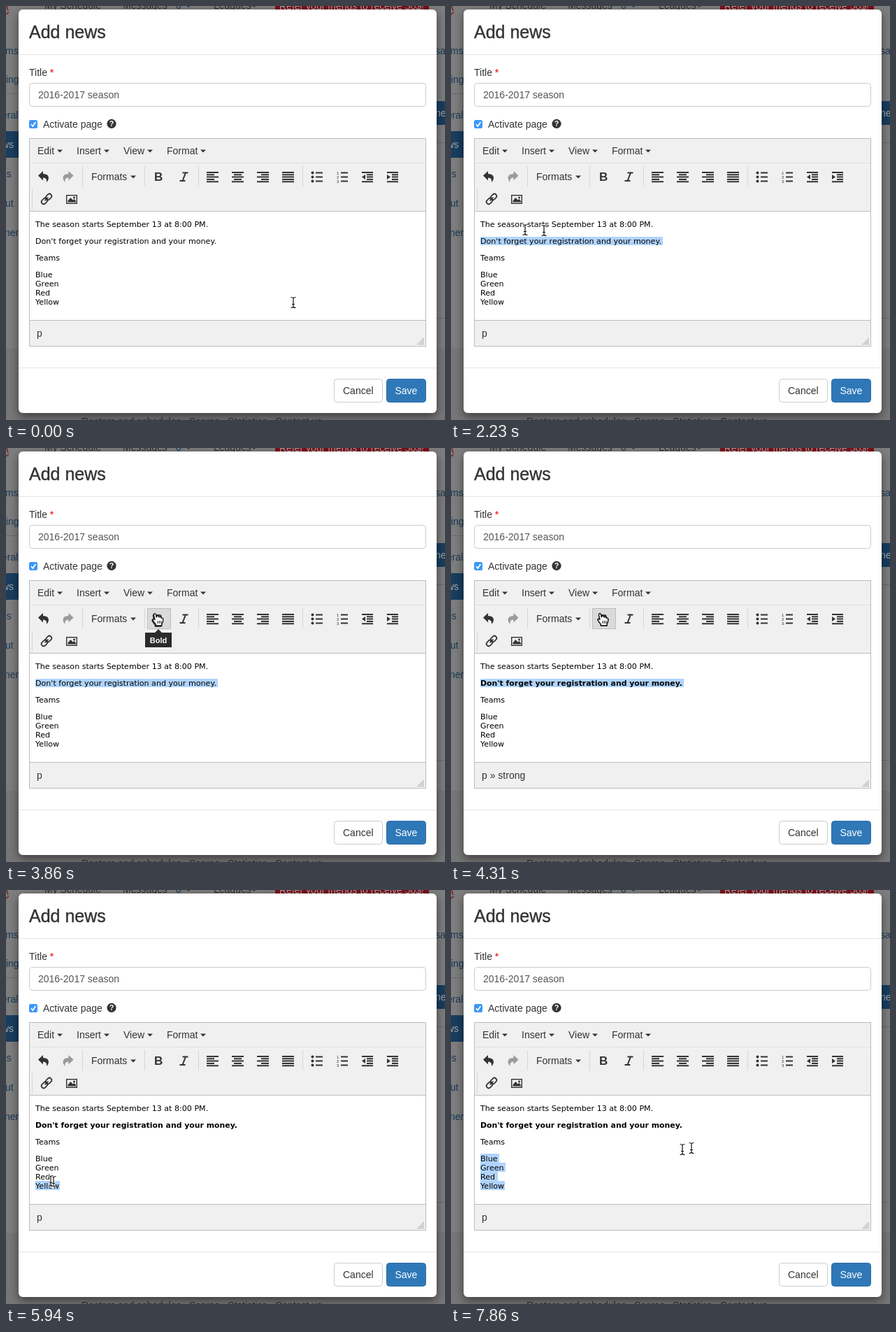
An HTML page that plays this animation: 628x592 px, repeating every 8 s.

```html
<!DOCTYPE html>
<html lang="en">
<head>
<meta charset="utf-8">
<title>Add news</title>
<style>
html, body { margin: 0; width: 100%; height: 100%; overflow: hidden; background: #7e7e7e; }
svg { display: block; width: 628px; height: 592px; }
text { font: 14px "Liberation Sans", sans-serif; fill: #333; white-space: pre; }
.page text { fill: #2c2c2c; }
.page .link { fill: #17395a; }
.page .light { fill: #a6a6a6; }
.modal { filter: drop-shadow(0 5px 7px rgba(0, 0, 0, .5)); }
.icon { fill: none; stroke: #333; stroke-width: 2; }
.solid { fill: #333; }
.content text { font: 11.1px "DejaVu Sans", sans-serif; fill: #000; }
.content .strong { font-weight: bold; font-size: 10.9px; }
.selection rect { fill: #b0d4fd; }
</style>
</head>
<body>
<svg viewBox="0 0 628 592">
  <defs>
    <path id="drop" class="solid" d="M0 0h8l-4 4z"/>
    <g id="ibeam" fill="none">
      <path id="beam" d="M-3.5 -7.5q3 0 3.5 1.5q.5 -1.5 3.5 -1.5M0 -6.5V6.5M-3.5 7.5q3 0 3.5 -1.5q.5 1.5 3.5 1.5M-2 2.5h4" stroke="#fff" stroke-width="2.6"/>
      <use href="#beam"/>
      <path d="M-3.5 -7.5q3 0 3.5 1.5q.5 -1.5 3.5 -1.5M0 -6.5V6.5M-3.5 7.5q3 0 3.5 -1.5q.5 1.5 3.5 1.5M-2 2.5h4" stroke="#111" stroke-width="1.2"/>
    </g>
    <path id="arrow" d="M0 0v14l3.3 -3 2.2 5 2.2 -1 -2.2 -4.8h4.5z" fill="#000" stroke="#fff"/>
    <g id="hand" stroke="#111" stroke-linejoin="round">
      <path d="M-2.5 9L-3 6.5Q-7 2 -7 .5Q-6.5 -1.5 -4 .5L-5.5 -6Q-5.5 -8.5 -3.8 -8.3Q-2.5 -8 -1.8 -3Q-1.6 -5 .2 -4.8Q1.8 -4.5 2 -3Q3 -4.5 4.5 -3.3L5 -1.8Q7.5 -2.5 7.8 0Q8 4 6 6.5V9z" fill="#fff" stroke-width="1.3"/>
      <path d="M0 2v4M2.4 2v4M4.8 2v4" fill="none"/>
    </g>
  </defs>

  <g class="page">
    <rect width="628" height="592" fill="#7e7e7e"/>
    <rect y="490" width="628" height="102" fill="#777"/>
    <path d="M0 125.5h18M616 195.5h12M616 446.5h12" stroke="#696969"/>
    <path d="M0 12l4 -3M1 0l2 7" stroke="#851820" stroke-width="1.5"/>
    <text x="55" y="4">My Schedule</text>
    <text x="167" y="4">Messages</text>
    <text x="243" y="4" class="link" font-weight="bold">0</text>
    <use href="#drop" x="257" y="-2"/>
    <text x="297" y="4">Leagues</text>
    <use href="#drop" x="351" y="-2"/>
    <rect x="385" width="220" height="8" fill="#7d0f19"/>
    <text x="391" y="5" class="light">Refer your friends to receive 50$!</text>
    <text x="-1" y="69" class="link">ms</text>
    <text x="-4" y="110" class="link">ting</text>
    <text x="-6" y="161" class="link">eral</text>
    <rect y="179" width="18" height="38" fill="#193e5f"/>
    <text x="-6" y="203" class="light">ws</text>
    <text x="-7" y="245" class="link">es</text>
    <text x="-1" y="287" class="link">ut</text>
    <text x="-2" y="329" class="link">ner</text>
    <text x="614" y="69" class="link">sage</text>
    <rect x="612" y="136" width="16" height="34" fill="#193e5f"/>
    <text x="614" y="158" class="light">ne</text>
    <text x="108" y="599" font-weight="bold">Rosters and schedules   Scores   Statistics   Contact us</text>
  </g>

  <rect class="modal" x="18" y="5" width="598" height="577" rx="6" fill="#fff"/>
  <path d="M18 69.5h598M18 517.5h598" stroke="#e5e5e5"/>
  <text x="33" y="46" style="font-size:25px" stroke="#333" stroke-width=".4">Add news</text>
  <text x="33" y="100" font-weight="bold">Title <tspan fill="#e00">*</tspan></text>
  <rect x="33.5" y="110.5" width="567" height="33" rx="4" fill="#fff" stroke="#ccc"/>
  <text x="46" y="132" style="fill:#555">2016-2017 season</text>
  <rect x="33" y="163" width="12" height="12" rx="2.5" fill="#3c97f7"/>
  <path d="M36 169.3l2.3 2.7 4 -6" fill="none" stroke="#fff" stroke-width="1.7"/>
  <text x="53" y="174">Activate page</text>
  <circle cx="151" cy="168.3" r="6.6" fill="#333"/>
  <text x="151" y="172.3" text-anchor="middle" style="font-size:11px;font-weight:bold;fill:#fff">?</text>

  <rect x="33.5" y="189.5" width="567" height="297" fill="#f0f0f0" stroke="#bcbcbc"/>
  <rect x="33.5" y="293.5" width="567" height="156" fill="#fff" stroke="#bcbcbc"/>
  <path d="M34 224.5h566" stroke="#e0e0e0"/>
  <path d="M109.5 229v29M198.5 229v29M275.5 229v29M424.5 229v29M37.5 262v29" stroke="#d6d6d6"/>
  <text x="45" y="212">Edit</text><use href="#drop" x="73" y="205.5"/>
  <text x="101" y="212">Insert</text><use href="#drop" x="140" y="205.5"/>
  <text x="168" y="212">View</text><use href="#drop" x="202" y="205.5"/>
  <text x="230" y="212">Format</text><use href="#drop" x="278" y="205.5"/>
  <text x="122" y="249">Formats</text><use href="#drop" x="178" y="242.5"/>

  <rect id="boldButton" x="202.5" y="229.5" width="33" height="29" fill="#dadada" stroke="#bdbdbd"/>
  <path id="undo" class="solid" d="M46 242.5l7 -6.5v4q8 0 8 6q0 3 -3 6q1 -6.500 -5 -6.500v4z"/>
  <use href="#undo" transform="matrix(-1 0 0 1 142.500 0)" opacity=".45"/>
  <text x="212" y="250" style="font-size:17px;font-weight:bold">B</text>
  <path class="icon" d="M252.500 238.500h8M248.500 250h8M257 238.500l-4.500 11.500" stroke-width="1.8"/>
  <path class="icon" d="M287 238h17M287 241.300h11M287 244.600h17M287 247.900h11M287 251.200h17
    M323 238h17M326 241.300h11M323 244.600h17M326 247.900h11M323 251.200h17
    M359 238h17M365 241.300h11M359 244.600h17M365 247.900h11M359 251.200h17
    M395 238h17M395 241.300h17M395 244.600h17M395 247.900h17M395 251.200h17"/>
  <path class="icon" d="M443 238.500h10M443 244.500h10M443 250.500h10M479 238.500h10M479 244.500h10M479 250.500h10
    M509 238h16M516 241.300h9M516 244.600h9M516 247.900h9M509 251.200h16
    M545 238h16M552 241.300h9M552 244.600h9M552 247.900h9M545 251.200h16"/>
  <path class="solid" d="M514 241v7l-5 -3.500zM545 241v7l5 -3.500z"/>
  <g class="solid"><circle cx="438.500" cy="238.500" r="2"/><circle cx="438.500" cy="244.500" r="2"/><circle cx="438.500" cy="250.500" r="2"/></g>
  <g style="font-size:6px">
    <text x="473" y="240.500" style="font-size:6px">1</text>
    <text x="473" y="246.500" style="font-size:6px">2</text>
    <text x="473" y="252.500" style="font-size:6px">3</text>
  </g>
  <g class="icon" transform="rotate(-45 58 276)" style="stroke-width:1.7">
    <rect x="49" y="272.800" width="9.500" height="6.400" rx="3.200"/>
    <rect x="57.500" y="272.800" width="9.500" height="6.400" rx="3.200"/>
    <path d="M54.500 276h7"/>
  </g>
  <rect class="icon" x="86.700" y="270.700" width="14.600" height="11.600" style="stroke-width:1.400"/>
  <path class="solid" d="M88.500 280.500v-2l4 -4.500 3 3.500 2 -1.500 2.500 3v1.500z"/>
  <circle class="solid" cx="97.500" cy="274" r="1.500"/>

  <g class="content">
    <g class="selection">
      <rect data-from="14" data-to="15" x="214" y="330" width="89" height="12"/>
      <rect data-from="15" data-to="28" x="42" y="330" width="261" height="12"/>
      <rect data-from="28" data-to="38" x="42" y="330" width="291" height="12"/>
      <rect data-from="45" x="42" y="377" width="27" height="13"/>
      <rect data-from="42" x="42" y="390" width="36" height="13"/>
      <rect data-from="41" x="42" y="403" width="25" height="13"/>
      <rect data-from="40" x="42" y="416" width="35" height="13"/>
    </g>
    <text x="42" y="316">The season starts September 13 at 8:00 PM.</text>
    <text x="42" y="340" data-to="28">Don't forget your registration and your money.</text>
    <text x="42" y="340" data-from="28" class="strong">Don't forget your registration and your money.</text>
    <text x="42" y="364">Teams</text>
    <text x="42" y="388">Blue</text>
    <text x="42" y="401">Green</text>
    <text x="42" y="414">Red</text>
    <text x="42" y="427">Yellow</text>
    <rect data-from="1" data-to="5" x="77" y="416" width="1" height="13"/>
  </g>

  <text x="44" y="473">p<tspan data-from="28" data-to="38"> » strong</tspan></text>
  <path d="M597 475v9M595 477v7M593 479v5M591 481v3M589 483v1" stroke="#777" stroke-dasharray="1 1"/>

  <rect x="469.500" y="533.500" width="69" height="33" rx="4" fill="#fff" stroke="#ccc"/>
  <text x="482" y="555">Cancel</text>
  <rect x="544.500" y="533.500" width="56" height="33" rx="4" fill="#2f78b7" stroke="#2a6ca6"/>
  <text x="556.500" y="555" style="fill:#fff">Save</text>

  <g data-from="26" data-to="29">
    <path d="M199 264h14l5 -5 5 5h14v21h-38z" fill="#2b2b2b"/>
    <text x="218" y="279" text-anchor="middle" style="font-size:11px;font-weight:bold;fill:#fff">Bold</text>
  </g>
  <use id="trail"/>
  <use id="cursor"/>
</svg>
<script>
const LOOP = 8000, TICK = 148.5, LEAD = 11;
const $ = id => document.getElementById(id);

Object.assign($('boldButton').dataset, { from: 25, to: 38 });
const timed = [...document.querySelectorAll('[data-from], [data-to]')];

// Pointer stops: tick, x, y
const path = [
  [0, 411, 424], [4, 411, 424], [5, 402, 412], [6, 373, 366], [7, 353, 356], [11, 337, 341],
  [13, 337, 341], [14, 214, 324], [15, 106, 320], [17, 62, 324], [20, 46, 329],
  [21, 46, 329], [23, 100, 300], [24, 175, 265], [25, 214, 247], [26, 217, 245],
  [30, 217, 245], [31, 160, 330], [32, 125, 373], [34, 125, 373], [35, 124, 382],
  [36, 112, 408], [38, 80, 423], [39, 80, 423], [41, 48, 408], [42, 43, 397], [43, 43, 396],
  [45, 41, 385], [48, 41, 394], [50, 41, 394], [51, 150, 386], [52, 292, 377], [53, 344, 369]
];

function pointerAt(tick) {
  const next = Math.max(1, path.findIndex(stop => stop[0] >= tick));
  const [t0, x0, y0] = path[next - 1], [t1, x1, y1] = path[next];
  const p = Math.max(0, (tick - t0) / (t1 - t0));
  return [x0 + (x1 - x0) * p, y0 + (y1 - y0) * p];
}

function placePointer(node, [x, y]) {
  const overBold = x > 202 && x < 236 && y > 229 && y < 259;
  node.setAttribute('href', overBold ? '#hand' : y < 293 ? '#arrow' : '#ibeam');
  node.setAttribute('transform', `translate(${Math.round(x)} ${Math.round(y)})`);
}

function draw() {
  const tick = Math.floor((performance.now() % LOOP + LEAD) / TICK);
  for (const node of timed) {
    const { from = 0, to = Infinity } = node.dataset;
    node.style.display = tick >= from && tick < to ? '' : 'none';
  }
  // Fast moves leave a second pointer a quarter tick behind.
  placePointer($('trail'), pointerAt(tick - .25));
  placePointer($('cursor'), pointerAt(tick));
  requestAnimationFrame(draw);
}
draw();
</script>
</body>
</html>
```
